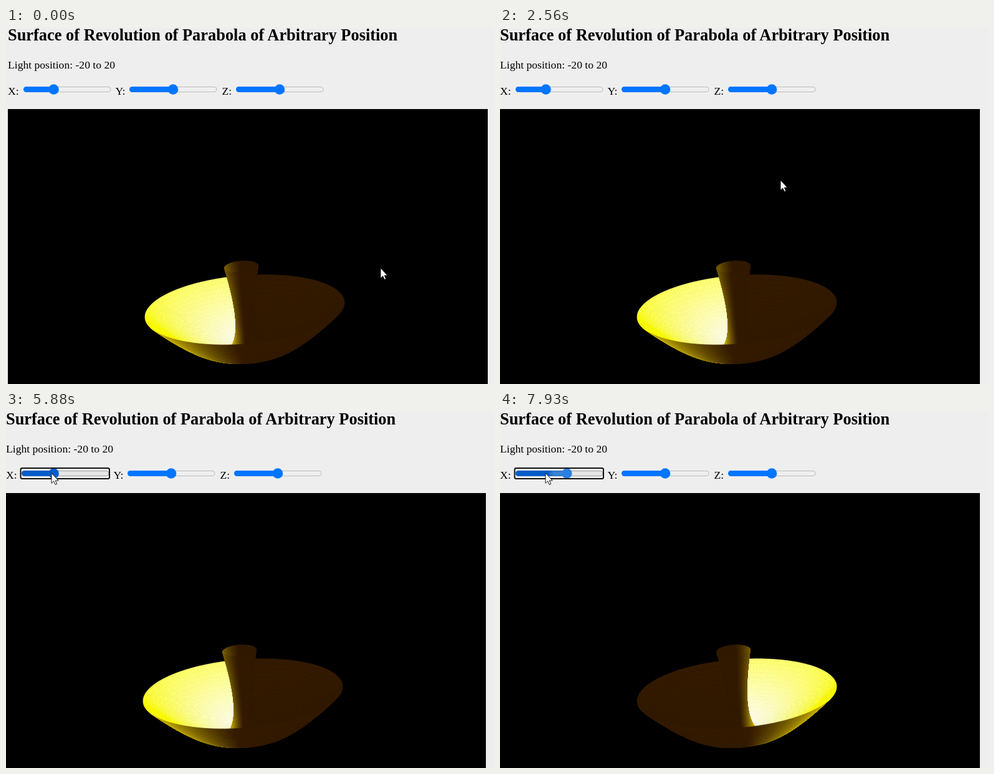
These frames come from a looping animation (783 by 571 pixels, 8000 ms). An HTML page with a canvas:

```html
<!DOCTYPE html>
<html lang="en">
<head>
<meta charset="utf-8">
<title>Surface of Revolution</title>
<style>
  html, body { margin: 0; width: 100%; height: 100%; overflow: hidden; background: #eee; }
  #page, svg { position: absolute; left: 0; top: 0; }
  canvas { position: absolute; left: 0; top: 130px; background: #000; }
  text { font: 17.6px "Liberation Serif", "Times New Roman", serif; }
  .title { font-size: 26.4px; font-weight: bold; }
</style>
</head>
<body>
<div id="page">
  <canvas id="view" width="770" height="441"></canvas>
  <svg width="783" height="571">
    <text class="title" x="0" y="20">Surface of Revolution of Parabola of Arbitrary Position</text>
    <text x="0" y="65">Light position: -20 to 20</text>
    <text x="0" y="107">X:</text>
    <text x="172.5" y="107">Y:</text>
    <text x="343.5" y="107">Z:</text>
    <g id="sliders"></g>
    <path id="cursor" d="M0 0V16.3L3.7 12.9 6.2 18.5 8.7 17.4 6.3 12H11.2Z" fill="#fff" stroke="#000" stroke-width=".9"/>
  </svg>
</div>
<script>
const DURATION = 8000;
const page = document.getElementById('page');
const sliders = document.getElementById('sliders');
const cursor = document.getElementById('cursor');
const ctx = document.getElementById('view').getContext('2d');
const clamp = v => Math.max(0, Math.min(1, v));
const countPassed = (times, t) => times.filter(s => t >= s).length;

// ---- surface: a quadratic (parabolic) profile revolved about a leaning axis
const TILT = 0.344, RINGS = 56, SECTORS = 180;

const profile = u => ({
  r: 27 - 104 * u + 237 * u * u,
  h: 69 * (1 - u) ** 2 - 324 * u * (1 - u),
  dr: -104 + 474 * u,
  dh: -462 * (1 - u) + 324 * u
});

function project(u, az) {
  const { r, h } = profile(u), side = r * Math.sin(az);
  return [380 + side - 0.08 * h, 322 - 0.072 * side - h - TILT * r * Math.cos(az)];
}

function buildQuads() {
  const quads = [], du = 1 / RINGS, da = 2 * Math.PI / SECTORS;
  for (let i = 0; i < RINGS; i++) {
    for (let j = 0; j < SECTORS; j++) {
      const u = i * du, a = j * da, az = a + da / 2, p = profile(u + du / 2);
      const stem = u < 0.5;
      quads.push({
        points: [project(u, a), project(u + du, a), project(u + du, a + da), project(u, a + da)],
        depth: -p.r * Math.cos(az) * 0.94 + p.h * 0.366,
        sin: Math.sin(az),
        cos: Math.cos(az),
        low: clamp(-p.h / 64),
        stem,
        inside: !stem && -p.dh * Math.cos(az) < TILT * p.dr
      });
    }
  }
  return quads.sort((a, b) => a.depth - b.depth);
}

function shade(q, light) {
  const facing = (cos, dist, radius) =>
    (light * q.sin + dist * cos - radius) / Math.hypot(light, dist);
  let k, blue = 0;
  if (q.inside) {
    k = clamp(5 * facing(q.cos, 1, 0.66));
    blue = k * Math.sqrt(Math.max(0, q.cos)) * (115 + 125 * q.low);
  } else {
    const cos = q.stem ? -Math.abs(q.cos) : q.cos;
    k = clamp(facing(cos, 0.15, 0.2)) ** 1.4;
    if (q.stem) k *= 0.35 + 0.6 * q.low ** 2;
  }
  return `rgb(${51 + 204 * k | 0},${26 + (q.inside ? 229 : 205) * k | 0},${blue | 0})`;
}

const quads = buildQuads();

function drawSurface(light) {
  ctx.clearRect(0, 0, 770, 441);
  ctx.lineWidth = 0.7;
  for (const q of quads) {
    ctx.fillStyle = ctx.strokeStyle = shade(q, light);
    ctx.beginPath();
    q.points.forEach(p => ctx.lineTo(...p));
    ctx.closePath();
    ctx.fill();
    ctx.stroke();
  }
}

// ---- sliders
const thumbX = value => 95 + value * 3.07;

function slider(left, thumb, hover, thumbColor, trail = '') {
  const blue = hover ? '#005cc8' : '#0075ff';
  return `<rect x="${left + 0.5}" y="94.5" width="139.5" height="8" rx="4"
      fill="${hover ? '#e5e5e5' : '#efefef'}" stroke="${hover ? '#a0a0a0' : '#b8bcbc'}"/>
    <rect x="${left}" y="94" width="${thumb - left}" height="9" rx="4.5" fill="${blue}"/>${trail}
    <circle cx="${thumb}" cy="98.5" r="8.3" fill="${thumbColor || blue}"/>`;
}

function drawSliders(value, hover) {
  let trail = '';
  for (let v = -4; v < value; v++)
    trail += `<ellipse cx="${thumbX(v) + 1}" cy="98.5" rx="5" ry="4.5" fill="#5a96dc" opacity=".3"/>`;
  const ring = value > -7 ?
    '<rect x="23.5" y="90" width="142.5" height="17" rx="2.5" fill="none" stroke="#101010" stroke-width="2"/>' : '';
  const color = value > -5 ? '#2b7fe0' : '';
  sliders.innerHTML = slider(25, thumbX(value), hover, color, trail) + ring +
    slider(195, 265, false) + slider(366, 436, false);
}

// ---- timeline
const KEY_PRESSES = [5880, 6080, 6210, 6410, 6540, 6740, 6940, 7070, 7200, 7400, 7930];
const SCROLLS = [1330, 1530, 1750];
// start, end, number of steps, target x, target y
const MOVES = [
  [70, 200, 3, 478, 255],
  [460, 600, 3, 450, 244],
  [3120, 3740, 10, 75, 86],
  [3880, 3950, 2, 74, 73],
  [4010, 4080, 2, 73, 98]
];

function cursorAt(t) {
  let x = 598, y = 385;
  for (const [start, end, steps, toX, toY] of MOVES) {
    if (t < start) break;
    const p = clamp((Math.floor((t - start) / (end - start) * (steps - 1) + 1e-6) + 1) / steps);
    x += (toX - x) * p;
    y += (toY - y) * p;
  }
  return [x, y];
}

let shownState = '', shownLight = null;

function frame(now) {
  const t = now % DURATION;
  const light = -7 + countPassed(KEY_PRESSES, t);
  const hover = t >= 4280 || (t >= 3740 && t < 3880);
  page.style.transform = `translateX(${3 - countPassed(SCROLLS, t)}px)`;
  cursor.setAttribute('transform', `translate(${cursorAt(t)})`);
  if (light !== shownLight) drawSurface(shownLight = light);
  const state = light + '/' + hover;
  if (state !== shownState) {
    shownState = state;
    drawSliders(light, hover);
  }
  requestAnimationFrame(frame);
}

const startTime = performance.now();
const tick = () => { };
frame(0);
</script>
</body>
</html>
```
